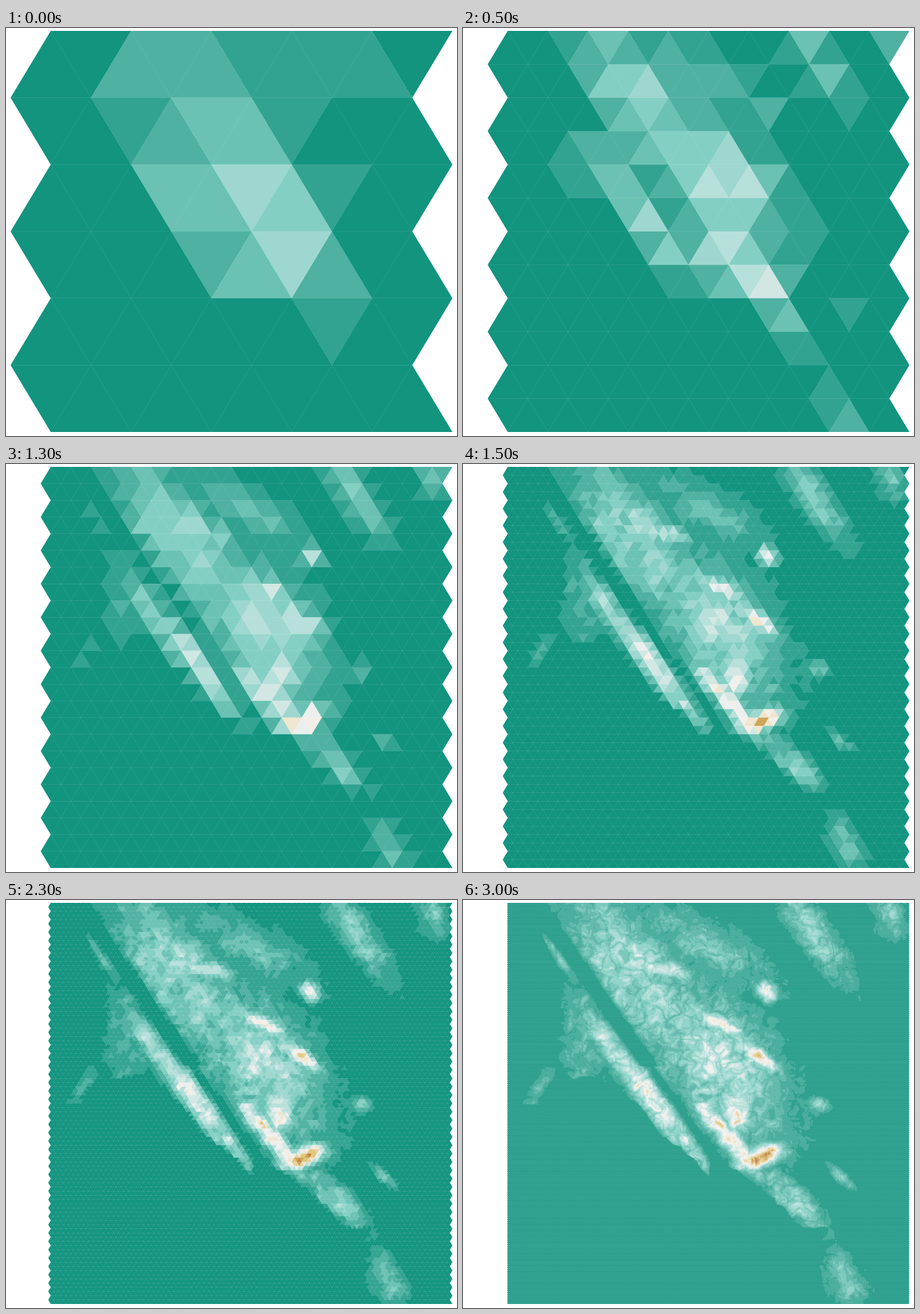
Recreate the animation shown at these times as an HTML page with a canvas. Size 786 by 712 pixels, loop 3500 ms.

```html
<!DOCTYPE html>
<html lang="en">
<head>
<meta charset="utf-8">
<title>Terrain in triangles</title>
<style>
  html, body { margin: 0; width: 100%; height: 100%; overflow: hidden; background: #fff; }
  canvas { display: block; }
</style>
</head>
<body>
<canvas id="stage" width="786" height="712"></canvas>
<script>
const W = 786, H = 712, LEFT = 78, TOP = 5, SIZE = 700;
const LEVELS = 7, STEP = 500;

const palette = ['#12947f', '#32a391', '#4fb1a2', '#6bc2b4', '#84cfc4', '#9ed7cf', '#b7e0db', '#d2e7e3',
  '#ebefed', '#f3efe8', '#efe6cf', '#e5d19b', '#e0c67d', '#cfa55a', '#bf8540', '#b0722b'];

// Outline of the open ocean.
const coast = [[0, 0], [148, 0], [152, 18], [135, 48], [176, 160], [145, 285], [102, 354], [156, 360],
  [132, 347], [155, 314], [235, 308], [312, 362], [342, 408], [395, 445], [425, 480], [435, 455],
  [470, 465], [545, 525], [590, 572], [640, 570], [614, 625], [640, 712], [0, 712]];

// Main landforms: centre x and y, angle in degrees, length, width, height.
const landforms = [
  [300, 130, 55, 170, 75, 5],
  [450, 290, 55, 150, 85, 5.2],
  [420, 75, 30, 140, 45, 2.6],
  [322, 335, 53, 150, 22, 8],
  [245, 240, 53, 28, 15, 8],
  [165, 95, 55, 60, 10, 3.2],
  [210, 240, 90, 110, 40, 2.2],
  [130, 335, 120, 50, 14, 2.2],
  [455, 405, 48, 85, 17, 10],
  [520, 447, 159, 38, 17, 15],
  [515, 272, 32, 40, 13, 10.5],
  [475, 375, 40, 30, 22, 8.5],
  [530, 160, 50, 18, 15, 10],
  [350, 120, 10, 50, 14, 7.5],
  [445, 215, 30, 55, 13, 8.5],
  [578, 525, 45, 70, 24, 4.8],
  [610, 55, 57, 100, 30, 4.2],
  [740, 22, 70, 45, 28, 3.2],
  [665, 660, 60, 50, 32, 3.6],
  [622, 357, 0, 18, 14, 5.2],
  [655, 480, 42, 28, 9, 3.6]
];

const clamp = (v, lo, hi) => Math.min(hi, Math.max(lo, v));

function makeCanvas(w, h) {
  const c = document.createElement('canvas');
  c.width = w;
  c.height = h;
  return c;
}

function makeNoise(seed) {
  const grid = Float32Array.from({ length: 16384 }, () => {
    seed = (Math.imul(seed, 1664525) + 1013904223) >>> 0;
    return seed / 4294967296;
  });
  const at = (x, y) => grid[(y & 127) * 128 + (x & 127)];
  return (x, y) => {
    const i = Math.floor(x), j = Math.floor(y);
    let u = x - i, v = y - j;
    u *= u * (3 - 2 * u);
    v *= v * (3 - 2 * v);
    const a = at(i, j), b = at(i, j + 1);
    const top = a + (at(i + 1, j) - a) * u;
    const low = b + (at(i + 1, j + 1) - b) * u;
    return top + (low - top) * v;
  };
}

function oceanMask() {
  const c = makeCanvas(W, H).getContext('2d');
  c.beginPath();
  for (const p of coast) c.lineTo(...p);
  c.fill();
  return c.getImageData(0, 0, W, H).data;
}

function makeTerrain() {
  const terrain = new Float32Array(W * H), noise = makeNoise(7), ocean = oceanMask();
  const forms = landforms.map(([x, y, deg, len, wid, h]) => {
    const c = Math.cos(deg * Math.PI / 180), s = Math.sin(deg * Math.PI / 180);
    return { x, y, h, ux: c / len, uy: s / len, vx: -s / wid, vy: c / wid };
  });

  const smooth = (x, y) => {
    let sum = 0;
    for (const f of forms) {
      const dx = x - f.x, dy = y - f.y;
      const u = dx * f.ux + dy * f.uy, v = dx * f.vx + dy * f.vy, q = u * u + v * v;
      if (q < 5) sum += (f.h * Math.exp(-q)) ** 4;
    }
    return Math.sqrt(Math.sqrt(sum));
  };

  // A straight fault: flooded in the north, a narrow valley further south.
  const fault = (x, y) => {
    const d = (x - 122 - 0.7 * y) * 0.82, flooded = y < 290;
    return 1 - (flooded ? 1 : 0.65) * Math.exp(-((d / (flooded ? 15 : 9)) ** 4));
  };

  // Thin branching creeks: creases of the noise at three sizes.
  const creeks = (x, y) => {
    let n = 1;
    for (const [size, depth] of [[30, 0.5], [14, 0.45], [7, 0.35]]) {
      const crease = Math.sqrt(Math.abs(2 * noise(x / size + size, y / size) - 1));
      n *= 1 - depth + depth * 1.9 * crease;
    }
    return n;
  };

  for (let y = TOP; y < TOP + SIZE; y++) {
    for (let x = LEFT; x < LEFT + SIZE; x++) {
      const h = smooth(x, y);
      if (h < 0.4) continue;
      const wx = noise(x / 13, y / 13 + 40) - 0.5, wy = noise(x / 13 + 60, y / 13) - 0.5;
      const cx = clamp(Math.round(x + 6 * wx), 0, W - 1), cy = clamp(Math.round(y + 6 * wy), 0, H - 1);
      if (ocean[(cy * W + cx) * 4 + 3] > 127) continue;
      const rough = Math.max(0.3, 1 - h / 20);
      terrain[y * W + x] = h * fault(x, y) * (1 + (creeks(x + 16 * wx, y + 16 * wy) - 1) * rough);
    }
  }
  return terrain;
}

// Mean height inside a triangle, from m steps along each side.
function meanHeight(terrain, a, b, c, m) {
  let sum = 0, count = 0;
  for (let i = 0; i < m; i++) {
    for (let j = 0; j < m - i; j++) {
      const p = (i + 1 / 3) / m, q = (j + 1 / 3) / m;
      const x = Math.floor(a[0] + (b[0] - a[0]) * p + (c[0] - a[0]) * q);
      const y = Math.floor(a[1] + (b[1] - a[1]) * p + (c[1] - a[1]) * q);
      if (x < LEFT || x >= LEFT + SIZE) continue;
      sum += terrain[y * W + x];
      count++;
    }
  }
  return count ? sum / count : 0;
}

function drawSeams(g, side, rows) {
  const shift = SIZE * 0.6;
  g.globalCompositeOperation = 'source-atop';
  g.strokeStyle = 'rgba(255,255,255,.17)';
  g.lineWidth = 0.5;
  for (const dir of [-1, 1]) {
    g.beginPath();
    for (let i = -Math.ceil(shift / side); i * side <= SIZE + shift; i++) {
      const x = LEFT + i * side;
      g.moveTo(x, TOP);
      g.lineTo(x + dir * shift, TOP + SIZE);
    }
    g.stroke();
  }
  g.beginPath();
  for (let r = 1; r < rows; r++) {
    g.moveTo(0, TOP + r * SIZE / rows);
    g.lineTo(W, TOP + r * SIZE / rows);
  }
  g.stroke();
}

function drawLevel(terrain, level) {
  const big = makeCanvas(W * 2, H * 2), g = big.getContext('2d');
  const scale = 2 ** level, side = 140 / scale, rows = 6 * scale, cols = 10 * scale;
  const rowH = SIZE / rows, m = Math.min(16, 2 ** (LEVELS - 1 - level));
  g.scale(2, 2);
  for (let r = 0; r < rows; r++) {
    const point = k => [LEFT + (k - 1) * side / 2, TOP + (r + ((k + r) % 2 ? 0 : 1)) * rowH];
    const tone = k => {
      const h = meanHeight(terrain, point(k), point(k + 1), point(k + 2), m);
      return clamp(Math.floor(h), 0, palette.length - 1);
    };
    let start = 0, current = tone(0);
    for (let k = 1; k <= cols; k++) {
      const next = k < cols ? tone(k) : -1;
      if (next === current) continue;
      const end = k - 1, odd = (end - start) % 2;
      g.fillStyle = palette[current];
      g.beginPath();
      for (const i of [start, start + 1, end + 1 + odd, end + 2 - odd]) g.lineTo(...point(i));
      g.fill();
      g.fill(); // closes the antialiased gap between rows
      start = k;
      current = next;
    }
  }
  drawSeams(g, side, rows);
  const out = makeCanvas(W, H);
  out.getContext('2d').drawImage(big, 0, 0, W, H);
  return out;
}

const ctx = document.getElementById('stage').getContext('2d');
const terrain = makeTerrain();
const levels = Array.from({ length: LEVELS }, (_, i) => drawLevel(terrain, i));
const begin = performance.now();
let shown = -1;

function render(now) {
  const index = Math.floor(Math.max(0, now - begin) / STEP) % LEVELS;
  if (index !== shown) {
    shown = index;
    ctx.fillStyle = '#fff';
    ctx.fillRect(0, 0, W, H);
    ctx.drawImage(levels[index], 0, 0);
  }
  requestAnimationFrame(render);
}
render(begin);
</script>
</body>
</html>
```
